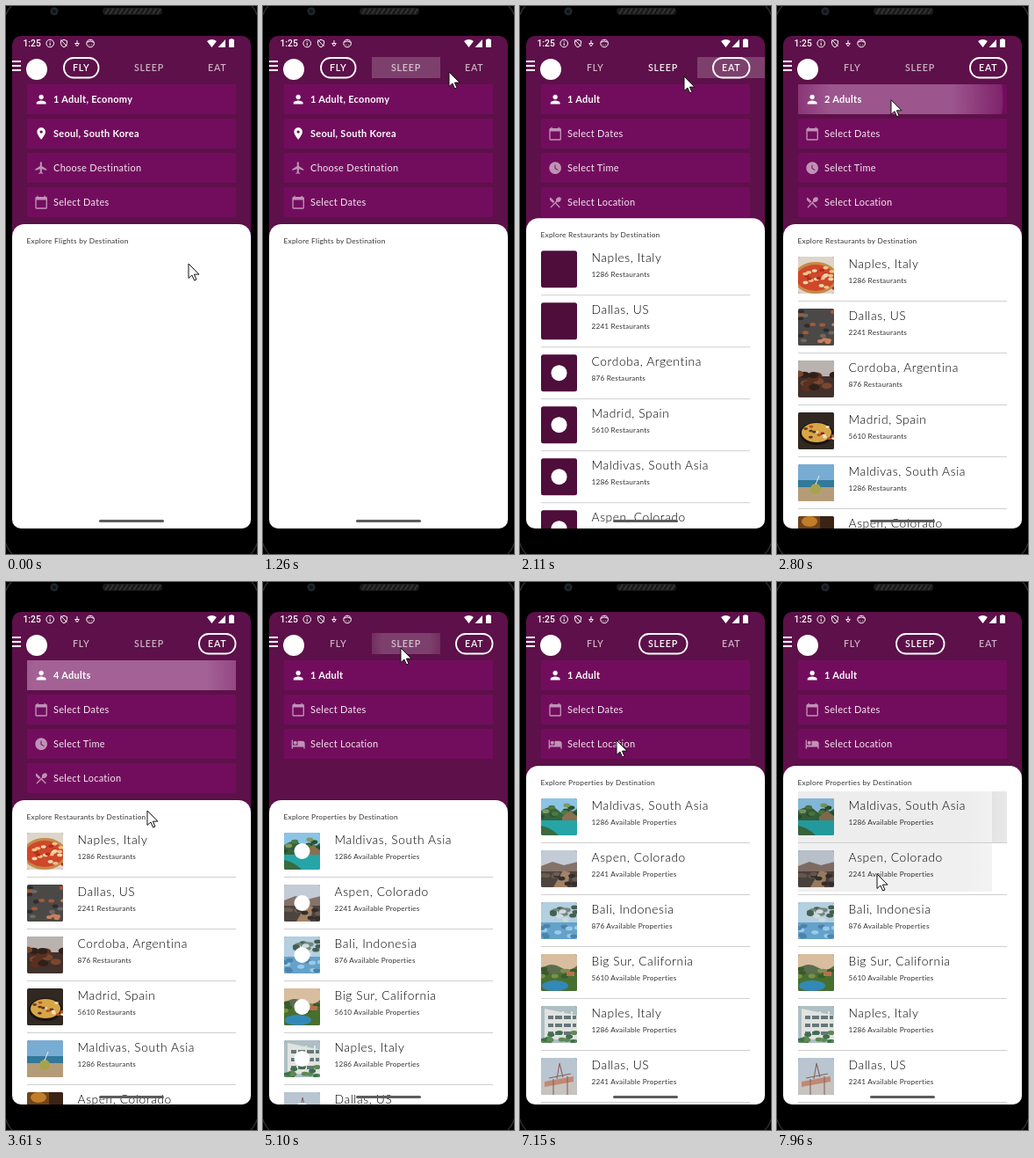
These frames come from a looping animation (286x623 px, 7.99 s). An HTML page:

```html
<!DOCTYPE html>
<html lang="en">
<head>
<meta charset="utf-8">
<title>Travel app</title>
<style>
html, body { margin: 0; width: 100%; height: 100%; overflow: hidden; background: #000; }
svg { display: block; }
#stage { width: 100vw; height: 100vh; }
text { font-family: Lato, "Open Sans", sans-serif; white-space: pre; }
.tab { font-size: 10.7px; font-weight: 600; letter-spacing: .75px; fill: #fff; }
.hint { font-size: 11px; letter-spacing: .28px; fill: #f6e6f2; }
.value { font-size: 11px; font-weight: 700; letter-spacing: .28px; fill: #fff; }
.head { font-size: 8.3px; letter-spacing: .25px; fill: #333; }
.name { font-size: 13.8px; font-weight: 300; letter-spacing: .6px; fill: #000; }
.sub { font-size: 8.2px; letter-spacing: .2px; fill: #333; }
.clock { font: 500 10.3px Roboto, sans-serif; fill: #fff; }
</style>
</head>
<body>
<svg id="stage" viewBox="0 0 286 623"></svg>
<script>
const LOOP = 7990;

const ICONS = {
  person: 'M12 12c2.21 0 4-1.79 4-4s-1.79-4-4-4-4 1.79-4 4 1.79 4 4 4zm0 2c-2.67 0-8 1.34-8 4v2h16v-2c0-2.66-5.33-4-8-4z',
  pin: 'M12 2C8.13 2 5 5.13 5 9c0 5.25 7 13 7 13s7-7.75 7-13c0-3.87-3.13-7-7-7zm0 9.5a2.5 2.5 0 1 1 0-5 2.5 2.5 0 0 1 0 5z',
  plane: 'M21 16v-2l-8-5V3.5c0-.83-.67-1.5-1.5-1.5S10 2.67 10 3.5V9l-8 5v2l8-2.5V19l-2 1.5V22l3.5-1 3.5 1v-1.5L13 19v-5.5l8 2.5z',
  calendar: 'M20 3h-1V1h-2v2H7V1H5v2H4c-1.1 0-2 .9-2 2v16c0 1.1.9 2 2 2h16c1.1 0 2-.9 2-2V5c0-1.1-.9-2-2-2zm0 18H4V8h16v13z',
  time: 'M12 2C6.5 2 2 6.5 2 12s4.5 10 10 10 10-4.5 10-10S17.5 2 12 2zm4.2 14.2L11 13V7h1.5v5.2l4.5 2.7-.8 1.3z',
  food: 'M8.1 13.34l2.83-2.83L3.91 3.5c-1.56 1.56-1.56 4.09 0 5.66l4.19 4.18zm6.78-1.81c1.53.71 3.68.21 5.27-1.38 1.91-1.91 2.28-4.65.81-6.12-1.46-1.46-4.2-1.1-6.12.81-1.59 1.59-2.09 3.74-1.38 5.27L3.7 19.87l1.41 1.41L12 14.41l6.88 6.88 1.41-1.41L13.41 13l1.47-1.47z',
  bed: 'M7 13c1.66 0 3-1.34 3-3S8.66 7 7 7s-3 1.34-3 3 1.34 3 3 3zm12-6h-8v7H3V5H1v15h2v-3h18v3h2v-9c0-2.21-1.79-4-4-4z'
};

const box = (x, y, w, h, fill, more = '') =>
  `<rect x="${x}" y="${y}" width="${w}" height="${h}" fill="${fill}" ${more}/>`;
const oval = (x, y, rx, ry, fill) => `<ellipse cx="${x}" cy="${y}" rx="${rx}" ry="${ry}" fill="${fill}"/>`;
const shape = (d, fill) => `<path d="${d}" fill="${fill}"/>`;
const line = (d, color, w) => `<path d="${d}" fill="none" stroke="${color}" stroke-width="${w}"/>`;
const label = (x, y, cls, str, more = '') => `<text x="${x}" y="${y}" class="${cls}" ${more}>${str}</text>`;

let seed = 7;
const rnd = () => (seed = seed * 16807 % 2147483647) / 2147483647;
const blobs = (n, y, h, size, colors) => Array.from({ length: n }, (_, i) =>
  oval((rnd() * 42).toFixed(1), (y + rnd() * h).toFixed(1), size, size * .6, colors[i % colors.length])).join('');

// Small 42 x 42 scenes in flat tones
const PHOTOS = {
  pizza: () => box(0, 0, 42, 42, '#ded5c9') + oval(20, 24, 25, 18, '#c58a48') + oval(20, 24, 22, 15, '#d0472a') +
    blobs(22, 12, 24, 3, ['#f0c489', '#b52c1c', '#e8d9ae']),
  grill: () => box(0, 0, 42, 42, '#4b4947') + blobs(20, 3, 36, 3.4, ['#a8573a', '#2f2d2c', '#c9805c', '#6d6965']),
  steak: () => box(0, 0, 42, 42, '#b9b2ae') + box(0, 18, 42, 24, '#42302a') + blobs(12, 15, 18, 6, ['#5a3021', '#7b4630', '#30201b']),
  paella: () => box(0, 0, 42, 42, '#302821') + oval(21, 24, 19, 13, '#17120f') + oval(21, 23, 17, 11, '#d8a646') +
    blobs(16, 15, 15, 2.4, ['#eee0bd', '#c54d28', '#5c3925']),
  beach: () => box(0, 0, 42, 42, '#79acd3') + box(0, 18, 42, 8, '#32799a') + box(0, 26, 42, 16, '#b59c78') +
    oval(20, 28, 6, 6, '#a7a24c') + line('M20 23L24 13', '#eee', 1),
  lamp: () => box(0, 0, 42, 42, '#70451d') + oval(13, 6, 9, 6, '#c27d28') + box(25, 0, 17, 42, '#3b2414'),
  lagoon: () => box(0, 0, 42, 42, '#8cc4e6') + shape('M0 14Q12 6 20 14T42 11V25H0z', '#38633d') +
    blobs(14, 7, 15, 4, ['#26502f', '#4d7a42', '#7d9a63']) + shape('M24 21l9-7 9 7v5H24z', '#8a6f51') +
    box(0, 25, 42, 17, '#25a5a8') + shape('M0 42V31Q13 34 20 42z', '#3b6a3f'),
  dusk: () => box(0, 0, 42, 42, '#c3cbd6') + shape('M0 18L13 13 26 17 42 13V42H0z', '#857268') + box(0, 24, 42, 18, '#4d443f') +
    shape('M14 42L25 23 33 25 30 42z', '#a28265') + blobs(10, 24, 16, 4, ['#342f2d', '#6a5c52']),
  palms: () => box(0, 0, 42, 42, '#b3cfe0') + blobs(16, 5, 16, 4, ['#465f50', '#71867a', '#d0dadc']) + box(0, 23, 42, 19, '#64a2cb') +
    blobs(12, 26, 14, 4, ['#9acae5', '#4d82aa']),
  hills: () => box(0, 0, 42, 42, '#d9bd9f') + shape('M0 17Q11 8 22 15T42 12V42H0z', '#5b6d4e') + box(0, 22, 42, 20, '#47702f') +
    blobs(10, 17, 9, 4, ['#385a2c', '#7b8f49']) + oval(16, 36, 15, 6, '#3289b7') + box(29, 20, 9, 5, '#b5714c'),
  hotel: () => box(0, 0, 42, 42, '#aebfc5') + shape('M4 3L42 11V38H4z', '#e0e3df') +
    [0, 1, 2].map(i => box(8, 11 + i * 9, 32, 4, '#66767a')).join('') + [0, 1, 2].map(i => box(14 + i * 10, 6, 2, 32, '#e0e3df')).join('') +
    blobs(14, 30, 12, 4, ['#3e704a', '#5d8a55']),
  sign: () => box(0, 0, 42, 42, '#b9c6d1') + box(0, 27, 42, 15, '#c6c3c0') + shape('M4 27L37 21V27L4 33z', '#c18872') +
    line('M14 42V24M30 42V21M18 24L21 6 25 22M9 23L34 18', '#8a6358', 1.1)
};

const SCREENS = {
  fly: {
    top: 248, head: 'Explore Flights by Destination', unit: '', rows: [],
    fields: [['person', '1 Adult, Economy', 1], ['pin', 'Seoul, South Korea', 1], ['plane', 'Choose Destination'], ['calendar', 'Select Dates']]
  },
  sleep: {
    top: 209, head: 'Explore Properties by Destination', unit: 'Available Properties',
    rows: [['Maldivas, South Asia', 'lagoon'], ['Aspen, Colorado', 'dusk'], ['Bali, Indonesia', 'palms'],
      ['Big Sur, California', 'hills'], ['Naples, Italy', 'hotel'], ['Dallas, US', 'sign']],
    fields: [['person', '1 Adult', 1], ['calendar', 'Select Dates'], ['bed', 'Select Location']]
  },
  eat: {
    top: 248, head: 'Explore Restaurants by Destination', unit: 'Restaurants',
    rows: [['Naples, Italy', 'pizza'], ['Dallas, US', 'grill'], ['Cordoba, Argentina', 'steak'],
      ['Madrid, Spain', 'paella'], ['Maldivas, South Asia', 'beach'], ['Aspen, Colorado', 'lamp']],
    fields: [['person', '1 Adult', 1], ['calendar', 'Select Dates'], ['time', 'Select Time'], ['food', 'Select Location']]
  }
};
const COUNTS = [1286, 2241, 876, 5610, 1286, 2241];
// name, text x, pill x, pill width
const TABS = [['fly', 76, 66, 39.5], ['sleep', 146, 136, 54.5], ['eat', 230, 220, 41.5]];
const SWITCHES = [[-9000, 'fly'], [1330, 'sleep'], [1900, 'eat'], [5070, 'sleep']];
const ADULT_CLICKS = [2700, 2950, 3390];

// x, y, width, height, touch x, start, strength, color, remaining strength
const RIPPLES = [
  [124, 58, 78, 24, 163, 1000, .2, '#fff', 0],
  [202, 58, 77, 24, 240, 1820, .2, '#fff', 0],
  [24, 89, 238, 34, 130, 2600, .3, '#fff', 0],
  [24, 89, 238, 34, 130, 2850, .3, '#fff', 0],
  [24, 89, 238, 34, 130, 3330, .35, '#fff', 0],
  [124, 58, 78, 24, 163, 4950, .2, '#fff', 0],
  [24, 128, 238, 34, 108, 5740, .24, '#fff', 0],
  [24, 167, 238, 34, 110, 7150, .24, '#fff', 0],
  [24, 238, 221, 58, 114, 7570, .12, '#000', .04],
  [245, 238, 17, 58, 114, 7570, .14, '#000', .14],
  [24, 297, 221, 55, 114, 7660, .06, '#000', .06]
];

// time, x, y
const POINTER = [
  [30, 208, 293], [150, 206, 300], [350, 254, 230], [560, 138, 130], [780, 160, 74], [1080, 160, 74],
  [1260, 212, 75], [1450, 238, 74], [1850, 238, 74], [2110, 187, 80], [2400, 130, 106], [3400, 130, 108],
  [3610, 161, 260], [4030, 150, 438], [4200, 130, 525], [4400, 62, 440], [4830, 158, 73], [4920, 157, 75],
  [5200, 157, 75], [5700, 108, 147], [6030, 108, 147], [6510, 108, 250], [6700, 60, 215], [6870, 110, 180],
  [7180, 110, 180], [7390, 114, 262], [7600, 114, 262], [7960, 114, 332]
];

const clamp = v => Math.max(0, Math.min(1, v));
const ramp = (t, a, b) => clamp((t - a) / (b - a));
const mix = (a, b, k) => a + (b - a) * k;
const smooth = k => k * k * (3 - 2 * k);
const easeOut = k => 1 - (1 - k) ** 4;

function fieldsOf(key) {
  return `<g id="${key}Fields">` + SCREENS[key].fields.map(([icon, str, filled], i) => {
    const y = 89 + i * 39;
    return box(24, y, 238, 34, '#720d5d', 'rx="1.5"') +
      `<path d="${ICONS[icon]}" transform="translate(32 ${y + 9}) scale(.68)" fill="#fff" opacity="${filled ? 1 : .55}"/>` +
      label(54, y + 21, filled ? 'value' : 'hint', str, i ? '' : `id="${key}Who"`);
  }).join('') + '</g>';
}

function listOf(key) {
  const { head, unit, rows } = SCREENS[key];
  return `<g id="${key}List">` + label(23.5, 21.5, 'head', head) + rows.map(([name, photo], i) =>
    `<g transform="translate(0 ${i * 59})">` + box(24, 37, 41, 42, '#4e0d3a', 'rx="2.5"') +
    `<g class="photo" transform="translate(24 37)" clip-path="url(#thumb)">${PHOTOS[photo]()}</g>` +
    '<circle class="mark" cx="44.5" cy="58" r="9" fill="#fff"/>' +
    label(81.5, 50, 'name', name) + label(81.5, 67, 'sub', `${COUNTS[i]} ${unit}`) +
    box(24, 87, 238, 1, '#cfcfcf') + '</g>').join('') + '</g>';
}

function rippleOf([x, y, w, h, px, , , color]) {
  const id = color === '#fff' ? 'light' : 'dark';
  return `<svg x="${x}" y="${y}" width="${w}" height="${h}"><circle class="ripple" cx="${px - x}" cy="${h / 2}" r="0" fill="url(#${id})"/></svg>`;
}

const glow = (id, c) => `<radialGradient id="${id}"><stop offset=".55" stop-color="${c}"/>` +
  `<stop offset="1" stop-color="${c}" stop-opacity=".3"/></radialGradient>`;

function phone() {
  const slots = Array.from({ length: 12 }, (_, i) => `M${113 + i * 5.4} 9l4-6`).join('');
  return box(0, 0, 286, 623, '#000') +
    line('M0 10Q2 4 6 0M286 10Q284 4 280 0M0 611Q2 618 7 623M286 611Q284 618 279 623', '#2b2b2b', 1.5) +
    '<circle cx="55" cy="6" r="4.6" fill="#20242c"/><circle cx="55" cy="6" r="2" fill="#0b111b"/>' +
    box(110, 2, 68, 8, '#191919', 'rx="4"') + line(slots, '#353535', 1.6);
}

function statusBar() {
  return label(19.5, 46, 'clock', '1:25') +
    line('M54.5 42.5a4.3 4.3 0 1 1-8.6 0a4.3 4.3 0 1 1 8.6 0M50.2 41.8V45M50.2 39.8V40.9', '#fff', 1) +
    line('M66 38.3L69.5 39.7V42.5Q69.3 45.5 66 47Q62.7 45.5 62.5 42.5V39.7ZM62.5 38.5L69.5 46', '#fff', 1) +
    line('M81 39V42.5M78.7 42.5H83.3L81 45.8Z', '#fff', 1) +
    line('M100.4 42.5a4.3 4.3 0 1 1-8.6 0a4.3 4.3 0 1 1 8.6 0M92.5 41.2Q96 38.5 99.7 41.2M94.8 43.8V44.6M97.4 43.8V44.6', '#fff', 1) +
    shape('M229 40Q234.5 36 240 40L234.5 47ZM250 38V47H241.5ZM255.5 38V37.2H258.5V38H260V47H254V38Z', '#fff');
}

const keys = Object.keys(SCREENS);
const stage = document.getElementById('stage');
stage.innerHTML = '<defs><clipPath id="screen"><rect x="7" y="34" width="272" height="560" rx="10"/></clipPath>' +
  '<clipPath id="thumb"><rect width="41" height="42" rx="2.5"/></clipPath>' +
  glow('light', '#fff') + glow('dark', '#000') + '</defs>' + phone() +
  '<g clip-path="url(#screen)">' + box(7, 34, 272, 560, '#5d1049') + statusBar() +
  line('M7 63H17M7 68H17M7 73H17', '#fff', 1.9) + '<circle cx="35" cy="72" r="12" fill="#fff"/>' +
  TABS.map(([key, x, px, w]) => box(px, 59, w, 22.5, 'none', `id="${key}Pill" rx="11" stroke="#fff" stroke-width="1.8"`) +
    label(x, 74, 'tab', key.toUpperCase(), `id="${key}Tab"`)).join('') +
  keys.map(fieldsOf).join('') +
  '<g id="panel">' + box(7, 0, 272, 420, '#fff', 'rx="14"') + keys.map(listOf).join('') + '</g>' +
  RIPPLES.map(rippleOf).join('') + box(106, 584, 74, 3, '#5c5c5c', 'rx="1.5"') + '</g>' +
  '<path id="pointer" d="M0 0V16.5L3.9 13 6.6 19 9 18 6.4 12.1H12Z" fill="#fff" stroke="#111" stroke-linejoin="round"/>';

const $ = id => document.getElementById(id);
const show = (el, on) => el.setAttribute('display', on ? 'inline' : 'none');
const fade = (el, v) => el.setAttribute('opacity', v.toFixed(3));
const ripples = stage.querySelectorAll('.ripple');

function drawThumbs(key, age, cached) {
  const list = $(key + 'List');
  const eat = key === 'eat';
  const loaded = eat ? ramp(age, 250, 600) : ramp(age, 150, 400);
  list.querySelectorAll('.photo').forEach(el => fade(el, cached ? 1 : loaded));
  list.querySelectorAll('.mark').forEach((el, i) => fade(el, eat && i < 2 ? 0 : 1 - loaded));
}

function drawRipple(el, [, , , h, , start, strength, , rest], t) {
  const age = t - start;
  el.setAttribute('r', age < 0 ? 0 : (h < 30 ? 100 : 190) * clamp(age / 300));
  fade(el, mix(strength, rest, ramp(age, 300, 450)));
}

function drawPointer(t) {
  let i = POINTER.findIndex(p => p[0] > t);
  if (i < 0) i = POINTER.length - 1;
  const b = POINTER[i], a = POINTER[Math.max(0, i - 1)];
  const k = smooth(ramp(t, a[0], b[0] + (a === b)));
  $('pointer').setAttribute('transform', `translate(${mix(a[1], b[1], k)} ${mix(a[2], b[2], k)})`);
}

function draw(t) {
  const n = SWITCHES.filter(s => s[0] <= t).length - 1;
  const [since, key] = SWITCHES[n];
  const prev = SWITCHES[Math.max(0, n - 1)][1];
  const age = t - since;
  const active = age > 60 ? key : prev;

  keys.forEach(k => {
    show($(k + 'Fields'), k === key);
    show($(k + 'List'), k === key);
    show($(k + 'Pill'), k === active);
    fade($(k + 'Tab'), k === active ? 1 : k === prev ? mix(1, .68, ramp(age, 150, 400)) : .68);
  });
  drawThumbs(key, age, n === 3);

  const top = mix(SCREENS[prev].top, SCREENS[key].top, easeOut(ramp(age, 80, 450)));
  $('panel').setAttribute('transform', `translate(0 ${top})`);

  const adults = 1 + ADULT_CLICKS.filter(c => c <= t).length;
  $('eatWho').textContent = `${adults} Adult${adults > 1 ? 's' : ''}`;
  RIPPLES.forEach((r, i) => drawRipple(ripples[i], r, t));
  drawPointer(t);
}

const begin = performance.now();
function tick() {
  draw((performance.now() - begin) % LOOP);
  requestAnimationFrame(tick);
}
tick();
</script>
</body>
</html>
```
